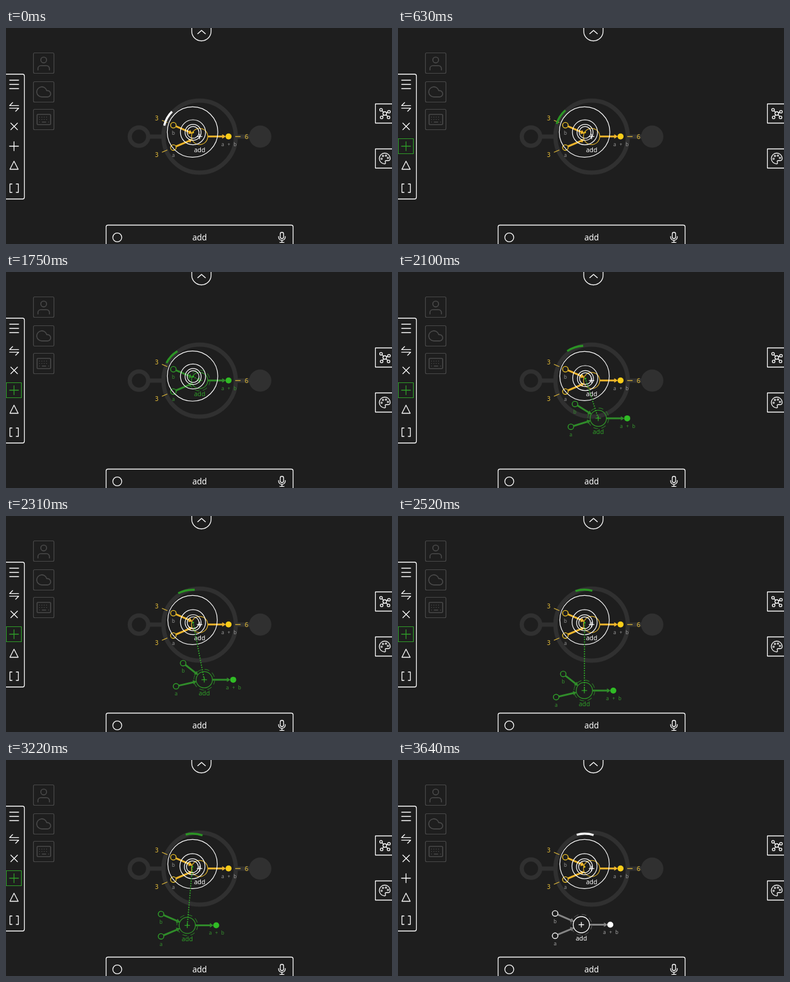
Animation, 640 px wide and 360 px high, one loop 3.85 s. Source, as an HTML page:

```html
<!DOCTYPE html>
<html lang="en">
<head>
<meta charset="utf-8">
<title>Node editor</title>
<style>
  html, body { margin: 0; width: 100%; height: 100%; overflow: hidden; background: #1e1e1e; }
  svg { display: block; width: 100vw; height: 100vh; fill: none; stroke-linecap: round; stroke-linejoin: round; }
  text { stroke: none; text-anchor: middle; font-family: "Noto Sans", "Open Sans", sans-serif; }
  .mono { font-family: "Noto Sans Mono", "DejaVu Sans Mono", monospace; }
  .line { stroke: #fff; stroke-width: 1.3; }
  .dim { stroke: #4a4a4a; stroke-width: 1.2; }
</style>
</head>
<body>
<svg viewBox="0 0 640 360">
  <g stroke="#303030" stroke-width="7" stroke-linecap="butt">
    <circle cx="321" cy="181" r="60"/>
    <circle cx="220.5" cy="181" r="15.3"/>
    <path d="M236 181H258M383 181H405"/>
    <circle cx="421.5" cy="181" r="18.5" fill="#303030" stroke="none"/>
  </g>

  <g class="dim">
    <rect x="45.5" y="41.5" width="34" height="34" rx="2"/>
    <rect x="45.5" y="89.5" width="34" height="34" rx="2"/>
    <rect x="45.5" y="135.5" width="34" height="34" rx="2"/>
    <g stroke-width="1.6">
      <circle cx="62.5" cy="53.3" r="4.8"/>
      <path d="M53 70v-2.4a4.8 4.8 0 0 1 4.8-4.8h9.4a4.8 4.8 0 0 1 4.8 4.8V70"/>
      <path d="M68.8 104.4h-1.3a8.4 8.4 0 1 0-8.1 10.5h9.4a5.25 5.25 0 0 0 0-10.5Z"/>
      <rect x="51.5" y="144" width="22.5" height="17" rx="1.5"/>
    </g>
    <path d="M55.5 148.500H71M55.5 152.5H71" stroke-dasharray="0.1 3.8" stroke-width="1.5"/>
    <path d="M55.5 156.8h.1M60 156.8H66M70.5 156.8h.1" stroke-width="1.5"/>
  </g>

  <g class="line">
    <rect x="-6" y="77" width="36.5" height="208" rx="3"/>
    <path d="M6 87H21M6 94H21M6 101H21"/>
    <path d="M11 124.300L6 129.300H21M6 133.700H21L16 138.700"/>
    <path d="M8 158.500L19 169.500M19 158.500L8 169.500"/>
    <path d="M13.3 222L6.5 235.500H20.200Z"/>
    <path d="M10 260H6.500V274H10M17 260H20.500V274H17"/>

    <path d="M308 -2V5.500a16 16 0 0 0 32 0V-2"/>
    <path d="M318 9.500L324.200 4L330.500 9.500" stroke-width="1.5"/>

    <rect x="612.5" y="126.5" width="40" height="32"/>
    <rect x="612.5" y="201.5" width="40" height="32"/>
    <circle cx="628" cy="142.5" r="3"/>
    <circle cx="621.8" cy="136.3" r="2.2"/>
    <circle cx="635" cy="139.5" r="2.2"/>
    <circle cx="622.8" cy="149" r="2.2"/>
    <circle cx="634.3" cy="149" r="2.2"/>
    <path d="M623.4 137.900L625.800 140.300M633 140.300L630.900 141.400M624.300 147.300L625.900 145M632.700 147.300L630.200 144.700"/>
    <path d="M628 226.500a9 9 0 1 1 9-9q0 3.500-3.500 3.500h-3q-2.500 0-1.500 2.700q1 2.500-1 2.800Z"/>
    <g stroke-width="1.1">
      <circle cx="622.8" cy="218" r="1.2"/>
      <circle cx="625" cy="213.3" r="1.2"/>
      <circle cx="630" cy="212.8" r="1.2"/>
      <circle cx="633.3" cy="216.5" r="1.2"/>
    </g>

    <rect x="166" y="328.5" width="310" height="44" rx="3"/>
    <circle cx="184.5" cy="349" r="7.4"/>
    <rect x="454.7" y="340.5" width="5.6" height="10.5" rx="2.8"/>
    <path d="M452 347.500v1a5.500 5.500 0 0 0 11 0v-1M457.500 354V357.300M454 357.300H461"/>
  </g>
  <text x="321" y="354" font-size="13.5" fill="#fff">add</text>

  <g id="live"></g>
</svg>
<script>
const STEP = 70, LOOP = 3850;
const PRESS = 70, AIM = 560, GRAB = 1260, AIMED = 1330, PULL = 1750, LOW = 2700, DROP = 3500;
const HUB = { x: 309.3, y: 173.4 };
const HOME = { x: 321, y: 180.8 };
const GRIP = { x: 3, y: 6 };

const gold = { ring: "#d6ab2a", pin: "#f0c428", dot: "#facd18", arrow: "#f0b62c", tag: "#929292", name: "#fff", plus: "#fff" };
const green = { ring: "#2f9428", pin: "#30a32a", dot: "#30bc25", arrow: "#308c2a", tag: "#35902e", name: "#2f9f28", plus: "#2fa328", dash: "#2a7a25" };
const white = { ring: "#fff", pin: "#fff", dot: "#fff", arrow: "#858585", tag: "#a0a0a0", name: "#fff", plus: "#fff", dash: "#555" };

const span = (t, from, to) => Math.min(1, Math.max(0, (t - from) / (to - from)));
const smooth = p => p * p * (3 - 2 * p);
const bump = p => Math.sin(Math.PI * p) ** 2;

// The finger circles while aiming, swings down in a bow, then settles back up
function finger(t) {
  const aim = span(t, AIM, AIMED), pull = span(t, PULL, LOW);
  const drift = span(t, LOW, 3430) ** 2, rise = smooth(span(t, LOW, 3300));
  return {
    x: 323 + smooth(aim) - 8 * bump(aim) - 24 * pull + 23.7 * bump(pull) + 7 * drift,
    y: 181 + 6 * smooth(aim) + 8 * bump(aim) + 115 * Math.sin(pull * Math.PI / 2) - 21.5 * rise
  };
}

// Strength and direction of the pull away from the hub
function tension(t) {
  const f = finger(t), dx = f.x - HUB.x, dy = f.y - HUB.y;
  const dist = Math.hypot(dx, dy), force = Math.min(1, dist / 70);
  return {
    force, angle: Math.atan2(dy, dx),
    x: HUB.x + dx / dist * force * 4.5,
    y: HUB.y + dy / dist * force * 4.5
  };
}

const circle = (x, y, r, stroke, w = 1.3, extra = "") =>
  `<circle cx="${x}" cy="${y}" r="${r}" stroke="${stroke}" stroke-width="${w}" ${extra}/>`;
const disc = (x, y, r, fill) => `<circle cx="${x}" cy="${y}" r="${r}" fill="${fill}"/>`;
const path = (d, stroke, w = 1.3, extra = "") =>
  `<path d="${d}" stroke="${stroke}" stroke-width="${w}" ${extra}/>`;
const label = (s, x, y, size, fill, cls = "mono") =>
  `<text class="${cls}" x="${x}" y="${y}" font-size="${size}" fill="${fill}">${s}</text>`;

// Arrow between two points, trimmed at both ends
function arrow(x1, y1, x2, y2, cut1, cut2, color) {
  const deg = Math.atan2(y2 - y1, x2 - x1) * 180 / Math.PI;
  const len = Math.hypot(x2 - x1, y2 - y1) - cut2;
  return `<g transform="translate(${x1} ${y1}) rotate(${deg})">` +
    path(`M${cut1} 0H${len - 5}`, color, 3, 'stroke-linecap="butt"') +
    `<path d="M${len - 6} -3.7L${len} 0L${len - 6} 3.7Z" fill="${color}"/></g>`;
}

// The two inputs trail behind the node by the given lag
function graph({ x, y }, c, lag = 0) {
  const bx = x - 43.5 + 9 * lag, by = y - 18.8 - 9.5 * lag;
  const ax = x - 43.5 - 3.5 * lag, ay = y + 18.4 - 8 * lag;
  const ox = x + 48;
  return arrow(bx, by, x, y, 5, 13, c.arrow) + arrow(ax, ay, x, y, 5, 13, c.arrow) +
    arrow(x, y, ox, y, 13.5, 4.5, c.arrow) +
    (c.dash ? circle(x, y, 17.3, c.dash, 1.1, 'stroke-dasharray="8 5.6" stroke-linecap="butt"') : "") +
    circle(x, y, 13.5, c.ring) + circle(bx, by, 4.6, c.pin, 1.4) + circle(ax, ay, 4.6, c.pin, 1.4) +
    disc(ox, y, 5, c.dot) + path(`M${x - 4} ${y}h8M${x} ${y - 4}v8`, c.plus) +
    label("b", bx, by + 16, 8.5, c.tag) + label("a", ax, ay + 15.7, 8.5, c.tag) +
    label("a + b", ox + 0.5, y + 15.7, 8.5, c.tag) + label("add", x, y + 26, 10.4, c.name, "");
}

function values() {
  const c = "#e6be38";
  return label("3", 250, 154, 10.5, c) + label("3", 250, 215, 10.5, c) + label("6", 399, 184.8, 10.5, c) +
    path("M259 154L267 157.5M259 207L267 203.5M380.5 180.8H388.5", c, 1.2);
}

function joystick({ force, angle, x, y }, held) {
  const r = 47.5 + 3 * force;
  const at = turn => {
    const a = angle + Math.PI + turn;
    return `${HUB.x + r * Math.cos(a)} ${HUB.y + r * Math.sin(a)}`;
  };
  const mx = HUB.x + (x - HUB.x) * 0.8, my = HUB.y + (y - HUB.y) * 0.8;
  return path(`M${at(-0.28)}A${r} ${r} 0 0 1 ${at(0.28)}`, held ? "#2b9424" : "#fff", 3.5, 'stroke-linecap="butt"') +
    circle(HUB.x, HUB.y, 42.2 - 1.2 * force, "#fff", 1.2) + circle(mx, my, 20.8, "#fff", 1.2) +
    circle(x, y, 13.3, "#fff", 1.2) + circle(x, y, 9.8, "#fff", 1.2);
}

function button(held) {
  const c = held ? "#2f9e28" : "#fff";
  return (held ? `<rect x="0.5" y="184.5" width="25" height="25" stroke="${c}" stroke-width="1.2"/>` : "") +
    path("M5.800 197H20.800M13.300 189.500V204.500", c);
}

function scene(t) {
  const held = t >= PRESS && t < DROP;
  const grabbed = t >= GRAB, moved = t > PULL;
  const pulling = grabbed && held;
  const f = finger(t), knob = tension(t);
  const copy = moved ? { x: f.x - GRIP.x, y: f.y - GRIP.y } : HOME;
  let out = values();
  if (!grabbed || moved) out += graph(HOME, gold);
  if (grabbed) out += graph(copy, held ? green : white, bump(span(t, PULL, 3080)));
  out += joystick(knob, held);
  if (pulling) out += path(`M${knob.x} ${knob.y}L${copy.x} ${copy.y}`, "#2fa828", 2.1, 'stroke-dasharray="0.1 3.9"');
  return out + disc(knob.x, knob.y, 1.5, pulling ? green.dot : gold.dot) + button(held);
}

const live = document.getElementById("live");
const start = performance.now();
let shown = -1;

function tick() {
  const t = Math.floor((performance.now() - start) % LOOP / STEP) * STEP;
  if (t !== shown) live.innerHTML = scene(shown = t);
  requestAnimationFrame(tick);
}
tick();
</script>
</body>
</html>
```
